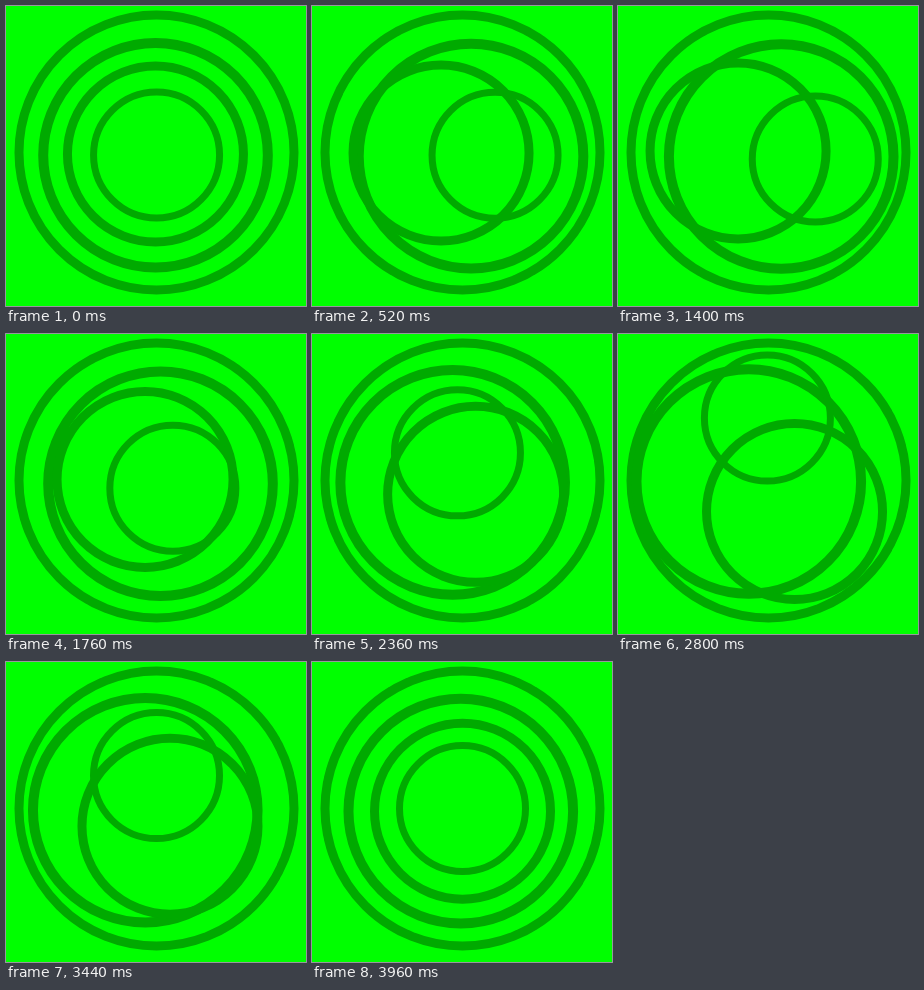
Animation of 300 by 300 pixels, one loop 4 s. Source, as an HTML page without scripts:

```html
<!DOCTYPE html>
<html lang="en">
<head>
<meta charset="utf-8">
<title>Drifting rings</title>
<style>
  html, body { margin: 0; width: 100%; height: 100%; overflow: hidden; background: #0f0; }
  svg { display: block; width: 100%; height: 100%; }
  circle { fill: none; stroke: #0a0; }
</style>
</head>
<body>
<svg viewBox="0 0 300 300">
  <circle cx="150.5" cy="146.5" r="137.5" stroke-width="9"/>

  <!-- Each ring drifts out, swings back through its rest point, drifts out again and returns. -->
  <circle r="112.3" stroke-width="10">
    <animateMotion dur="4s" repeatCount="indefinite" calcMode="linear"
      keyTimes="0;.28;.492;.72;1" keyPoints="0;.25;.5;.75;1"
      path="M149.5 149.2 L170 151.2 L149.5 149.2 L129 147.3 L149.5 149.2"/>
  </circle>

  <circle r="88" stroke-width="9">
    <animateMotion dur="4s" repeatCount="indefinite" calcMode="linear"
      keyTimes="0;.28;.492;.72;1" keyPoints="0;.2503;.5026;.7523;1"
      path="M149.5 148 L105.5 146 C105.5 146 137.3 142.2 149.5 148 C161.7 153.8 178.5 180.5 178.5 180.5 L149.5 148"/>
  </circle>

  <circle r="63" stroke-width="7">
    <animateMotion dur="4s" repeatCount="indefinite" calcMode="linear"
      keyTimes="0;.28;.492;.72;1" keyPoints="0;.2458;.4965;.7507;1"
      path="M150.5 149 L220.5 149.5 C220.5 149.5 162.2 161 150.5 149 C138.8 137 150.5 78 150.5 78 L150.5 149"/>
  </circle>
</svg>
</body>
</html>
```
